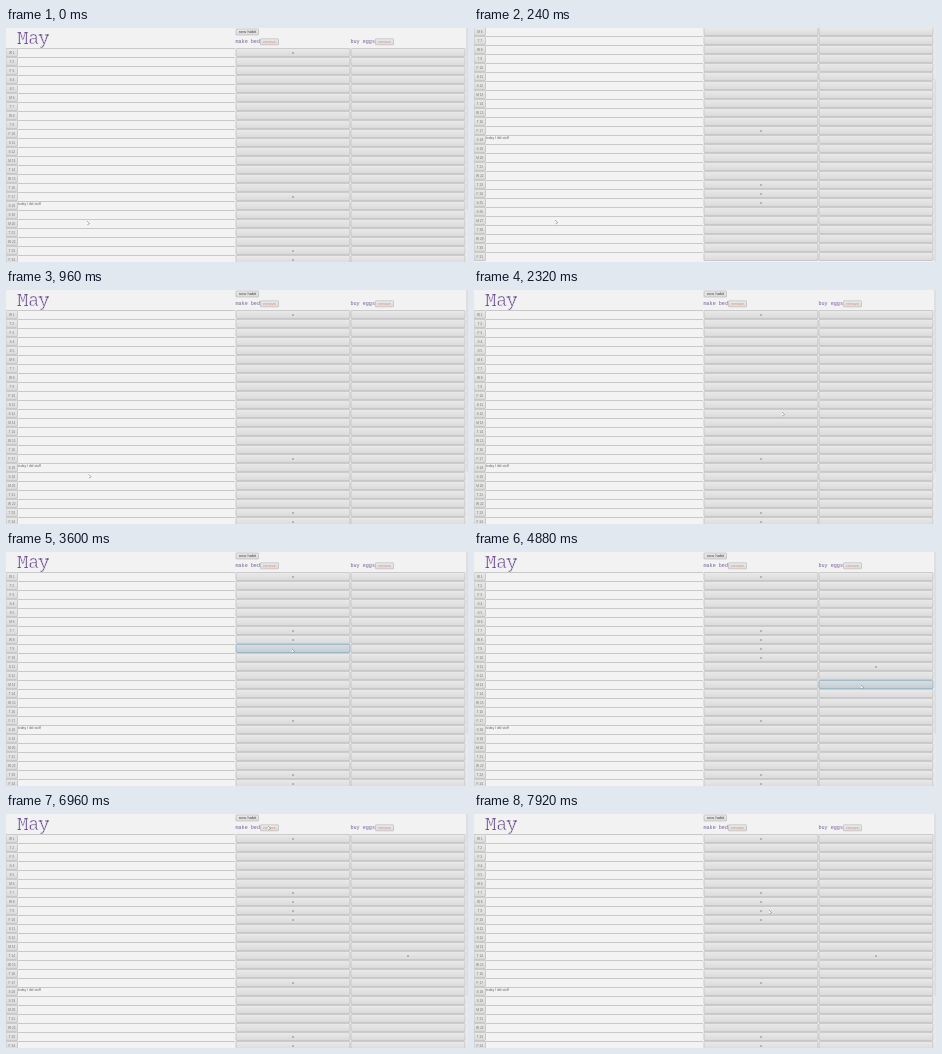
Animation, 462 px wide and 234 px high, one loop 8000 ms. Source, as an HTML page with a canvas:

```html
<!DOCTYPE html>
<html lang="en">
<head>
<meta charset="utf-8">
<title>May</title>
<style>
html, body { margin: 0; width: 100%; height: 100%; overflow: hidden; background: #f2f2f2; }
canvas { display: block; width: 462px; height: 234px; }
</style>
</head>
<body>
<canvas id="stage"></canvas>
<script>
const W = 462, H = 234, LOOP = 8000, STEP = 80;
const TOP = 20, ROW = 9, DAYS = 31, COL_W = 115;
const MONO = '"Liberation Mono", monospace';
const SANS = '"Liberation Sans", sans-serif';
const HABITS = ['make bed', 'buy eggs'];
const DONE = [1, 17, 23, 24, 25];
const PAPER = '#f2f2f2';

const colX = col => 229.5 + col * COL_W;
const rowY = day => TOP + (day - 1) * ROW;
const clamp = v => Math.min(1, Math.max(0, v));
const smooth = k => k * k * (3 - 2 * k);

// Each click toggles one day of one habit.
const click = (time, col, day) => ({ time, col, day });
const clicks = [
  ...[7, 8, 9, 10].map((day, i) => click(2960 + i * 340, 0, day)),
  click(4480, 1, 11), click(4960, 1, 13), click(5280, 1, 14),
  click(6240, 1, 13), click(6560, 1, 11)
];

// The pointer rests at each stop from `from` to `to` and glides between them.
const stop = (from, to, x, y) => ({ from, to, x, y });
const stops = [
  stop(0, 0, 81, 193),
  stop(1360, 1680, 83, 182),
  stop(2320, 2480, 308, 122),
  ...clicks.map(c => stop(c.time - 160, c.time + 80, c.col ? 387 : 286, rowY(c.day) + 5)),
  stop(6960, 7280, 262, 12),
  stop(7920, LOOP, 295, 96)
];

function pointerAt(t) {
  const i = stops.findLastIndex(s => s.from <= t);
  const a = stops[Math.max(0, i)], b = stops[i + 1];
  if (!b || t <= a.to) return a;
  const k = smooth((t - a.to) / (b.from - a.to));
  return { x: a.x + (b.x - a.x) * k, y: a.y + (b.y - a.y) * k };
}

function scrollAt(t) {
  const down = smooth(clamp(t / 240));
  const back = (1 - clamp((t - 400) / 560)) ** 1.75;
  return Math.round(66 * down * back);
}

const canvas = document.getElementById('stage');
const g = canvas.getContext('2d');
const dpr = window.devicePixelRatio || 1;
canvas.width = W * dpr;
canvas.height = H * dpr;

function rect(x, y, w, h, color) {
  g.fillStyle = color;
  g.fillRect(x, y, w, h);
}

function text(str, x, y, size, color, family = SANS, align = 'left') {
  g.font = size + 'px ' + family;
  g.fillStyle = color;
  g.textAlign = align;
  g.fillText(str, x, y);
}

const STYLES = {
  plain: ['#ebebeb', '#d9d9d9', '#bcbcbc'],
  hover: ['#f6f6f6', '#e6e6e6', '#bcbcbc'],
  press: ['#d9e0e4', '#c2ccd2', '#86a8bb']
};

function button(x, y, w, h, style = 'plain') {
  const [top, bottom, edge] = STYLES[style];
  const fill = g.createLinearGradient(0, y, 0, y + h);
  fill.addColorStop(0, top);
  fill.addColorStop(1, bottom);
  g.beginPath();
  g.roundRect(x + 0.5, y + 0.5, w - 1, h - 1, 0.5);
  g.fillStyle = fill;
  g.fill();
  g.lineWidth = 0.7;
  g.strokeStyle = edge;
  g.stroke();
}

// Thin slab-serif lettering: trimmed monospace glyphs plus small serifs.
function title() {
  const ink = '#5c3a86';
  text('May', 11.5, 16, 17.8, ink, MONO);
  g.lineWidth = 0.6;
  g.strokeStyle = PAPER;
  g.strokeText('May', 11.5, 16);
  for (const y of [4.3, 15.2])
    for (const x of [11.5, 18.3]) rect(x, y, 3.5, 0.8, ink);
  for (const x of [32.5, 39]) rect(x, 6.6, 4, 0.8, ink);
}

function header() {
  title();
  button(229.5, 0.5, 23.5, 7);
  text('new habit', 241.5, 5, 4.1, '#444', SANS, 'center');
  HABITS.forEach((name, i) => {
    const x = colX(i);
    text(name, x, 15, 5.1, '#76609a', MONO);
    button(x + 24.5, 10.3, 19, 7);
    text('remove', x + 34, 15, 3.8, '#e88672', SANS, 'center');
  });
}

function isMarked(col, day, t) {
  const toggles = clicks.filter(c => c.col === col && c.day === day && t >= c.time).length;
  const initial = col === 0 && DONE.includes(day);
  return initial !== (toggles % 2 === 1);
}

function isPressed(col, day, t) {
  return clicks.some(c => c.col === col && c.day === day && t >= c.time - 160 && t < c.time + 80);
}

function row(day, t, hover) {
  const y = rowY(day);
  rect(12, y, 217, ROW, '#f3f3f3');
  rect(12, y, 217, 1, '#c8c8c8');
  button(-0.5, y, 12.5, ROW);
  // the month opens on a Wednesday
  text('SMTWTFS'[(day + 2) % 7] + ' ' + day, 5.8, y + 6, 3.2, '#777', SANS, 'center');
  if (day === 18) text('today I did stuff', 11.8, y + 4.2, 3.4, '#666');
  HABITS.forEach((_, col) => {
    const x = colX(col);
    const over = hover && hover.x > x && hover.x < x + COL_W && hover.y > y && hover.y < y + ROW;
    button(x, y, COL_W, ROW, isPressed(col, day, t) ? 'press' : over ? 'hover' : 'plain');
    if (isMarked(col, day, t)) text('x', x + COL_W / 2, y + 6.2, 4.2, '#666', SANS, 'center');
  });
}

function pointer({ x, y }) {
  g.beginPath();
  g.moveTo(x, y);
  g.lineTo(x + 2.6, y + 2.6);
  g.lineTo(x + 0.3, y + 3.8);
  g.fillStyle = '#fff';
  g.fill();
  g.lineWidth = 0.6;
  g.strokeStyle = '#777';
  g.stroke();
}

function draw(t) {
  const offset = scrollAt(t);
  const p = pointerAt(t), before = pointerAt(t - STEP);
  const settled = Math.hypot(p.x - before.x, p.y - before.y) < 3;
  const hover = settled && { x: p.x, y: p.y + offset };
  g.setTransform(dpr, 0, 0, dpr, 0, 0);
  rect(0, 0, W, H, PAPER);
  g.save();
  g.translate(0, -offset);
  header();
  for (let day = 1; day <= DAYS; day++) row(day, t, hover);
  g.restore();
  rect(460, 0, 2, H, '#e9e9e9');
  rect(460.4, offset * 0.78, 1.4, 182, '#dadada');
  pointer(p);
}

const start = performance.now();
function frame() {
  const t = (performance.now() - start) % LOOP;
  draw(Math.floor(t / STEP) * STEP);
  requestAnimationFrame(frame);
}
frame();
</script>
</body>
</html>
```
